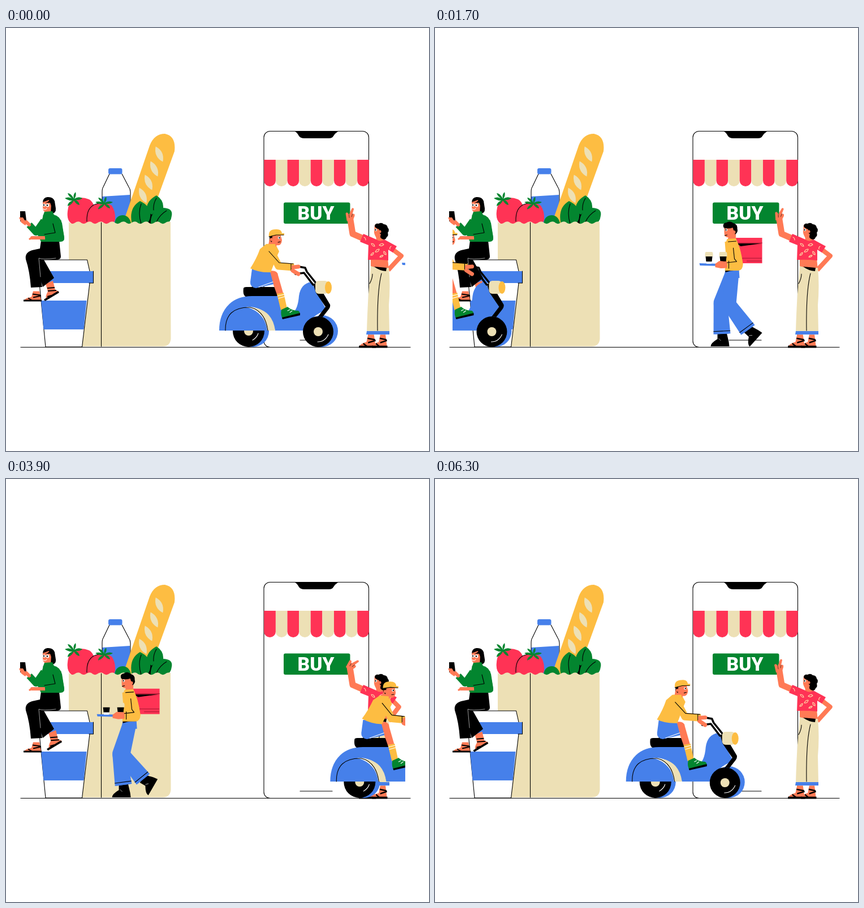
Animation of 748 by 748 pixels, one loop 6400 ms. Source, as an HTML page:

```html
<!DOCTYPE html>
<html lang="en">
<head>
<meta charset="utf-8">
<title>Shopping and delivery</title>
<style>
  html, body { margin: 0; width: 100%; height: 100%; overflow: hidden; background: #fff; }
  svg { display: block; width: 100vw; height: 100vh; }
  .b { fill: #4680ea } .r { fill: #ff3355 } .y { fill: #fdbd42 } .c { fill: #ede0b5 }
  .g { fill: #03852f } .s { fill: #ff7a55 } .k { fill: #000 } .w { fill: #fff }
  .l { fill: none; stroke: #000; stroke-width: 1.1; stroke-linecap: round; stroke-linejoin: round }
  .t { fill: none; stroke-linejoin: round; stroke-linecap: butt }
  .rd { stroke-linecap: round }
  .sb { stroke: #4680ea } .sy { stroke: #fdbd42 } .ss { stroke: #ff7a55 }
  .sg { stroke: #03852f } .sk { stroke: #000 }
</style>
</head>
<body>
<svg viewBox="0 0 748 748" xmlns="http://www.w3.org/2000/svg">
  <defs>
    <clipPath id="stage"><rect x="31" y="150" width="675" height="450"/></clipPath>
    <path id="slash" class="c" d="M0-15Q11 0 0 15Q-11 0 0-15Z"/>
    <path id="star" class="g" d="M0 1Q-9-5-16-1Q-9 4-2 3Q-11 6-11 13Q-3 10 0 3Q4 10 10 11Q9 4 2 2Q10 3 15-1Q8-5 1 0Q5-6 3-12Q-2-7 0 0Q-5-10-11-10Q-9-3 0 1Z"/>
    <g id="coffee">
      <path class="c" d="M-7 0L-6-3H6L7 0V5H-7Z"/>
      <path class="k" d="M-6 5H6L5 14H-5Z"/>
      <path class="w" d="M-5 14H5L4.500 18H-4.500Z"/>
    </g>
    <g id="shoe">
      <path class="k" d="M-8-2L8-3L12 14L13 22H-20Q-20 16-8 9Z"/>
      <path class="t" stroke="#fff" stroke-width=".6" d="M-6 8L-2 12"/>
    </g>
    <g id="sandal">
      <path class="s" d="M-5-16H6L9 0H-21Q-19-4-8-6Z"/>
      <path class="t sk" stroke-width="2" d="M-6-11L8-9M-5-5L9-8M-14-4L-7 0"/>
      <path class="k" d="M-22-1H10V2H-22Z"/>
    </g>
  </defs>

  <!-- phone -->
  <rect class="l" x="456" y="182.500" width="185.500" height="382" rx="11"/>
  <path class="k" d="M511 183H587Q582 186 579 191Q577 195 571 195H527Q521 195 518 191Q515 185 511 183Z"/>
  <g id="awning"></g>
  <rect class="g" x="491" y="308.500" width="117.500" height="37.500" rx="3"/>
  <text class="w" x="548" y="339" text-anchor="middle" font-family="Roboto, Arial, sans-serif" font-weight="900" font-size="33.500">BUY</text>
  <path class="l" d="M520 552H577M26 564.500H715"/>

  <!-- groceries -->
  <g>
    <path class="w" d="M183 258L172 281Q170 284 170 290V345H220V290Q220 284 217 281L205 258Z"/>
    <path class="b" d="M170 298L219 295V345H170Z"/>
    <path class="l" d="M183 258L172 281Q170 284 170 290V330M205 258L217 281Q220 285 220 290V330"/>
    <rect class="b" x="181" y="248" width="24.500" height="10.500" rx="3"/>
    <path class="y" d="M210 336L254 208Q262 187 281 187Q301 191 298 218L252 345H214Z"/>
    <use href="#slash" transform="translate(271 223) rotate(-25)"/>
    <use href="#slash" transform="translate(262 249) rotate(-25)"/>
    <use href="#slash" transform="translate(252 273) rotate(-25)"/>
    <use href="#slash" transform="translate(242 296) rotate(-25)"/>
    <path class="r" d="M120 303Q132 297 147 303Q160 310 160 346H116Q107 340 109 324Q110 309 120 303Z"/>
    <path class="r" d="M160 311Q176 307 187 314Q194 324 193 339Q191 346 186 347H143Q140 320 160 311Z"/>
    <path class="l" d="M143 342Q142 316 160 311L170 309"/>
    <use href="#star" transform="translate(120 302)"/>
    <use href="#star" transform="translate(174 309) scale(1 .9)"/>
    <path class="k" d="M250 312H268V346H250Z"/>
    <path class="g" d="M249 325Q246 307 266 296Q282 306 277 325Q267 321 258 330Z"/>
    <path class="g" d="M223 348Q216 318 237 306Q258 316 255 334Q254 346 240 350Z"/>
    <path class="g" d="M256 348Q254 325 274 318Q296 317 293 332Q292 344 280 349Z"/>
    <path class="g" d="M192 349Q192 332 206 331Q219 331 222 349Z"/>
    <path class="l" d="M239 311Q233 327 239 346M266 301Q260 311 261 322M284 323Q272 330 266 343"/>
  </g>
  <path id="bag" class="c"/>
  <path class="l" d="M168.500 344V563"/>

  <!-- cup -->
  <path class="w l" style="fill:#fff" d="M60 430L66 410H143.500L148 430V451L134.500 564H70L59 451Z"/>
  <path class="b" d="M62 482H142.500L137.500 533H66.500ZM62 430H154.500V451H62Z"/>
  <path class="l" d="M154.500 430V451H147"/>

  <!-- seated shopper -->
  <g>
    <g id="tap">
      <path class="s" d="M70 452L83 447L87 463L94 466L71 481Q69 474 74 466Z"/>
      <path class="t sk" stroke-width="2" d="M73 460L86 459M74 465L89 464M73 475L80 473"/>
      <path class="k" d="M67 480L92 465L94 468L69 483Z"/>
    </g>
    <use href="#sandal" transform="translate(53 481.500)"/>
    <path class="k" d="M62 376H94L97 404Q97 410 88 410H67L85 442L65 458L62 448L64 458L44 459Q42 430 35 409Q33 397 46 393L60 390Z"/>
    <path class="l" style="stroke:#fff;stroke-width:.6" d="M88 407Q65 410 58 407L61 440"/>
    <path class="s" d="M64 364H91V377H63Z"/>
    <path id="farArm" class="t sg" stroke-width="12"/>
    <path id="farFore" class="t ss rd" stroke-width="6"/>
    <path id="sweater" class="g"/>
    <path class="k" d="M65 309Q65 300 73 299Q83 298 86 306L88 319Q89 328 80 328Q71 326 68 320Z"/>
    <path class="s" d="M65 308L76 304L80 312L79 328H70L71 326Q65 325 65 317Z"/>
    <path class="k" d="M64 309Q74 310 77 304L84 305L82 320L78 309Z"/>
    <circle class="w" cx="67.500" cy="313" r="2.600"/><circle class="w" cx="73.500" cy="313.500" r="2.900"/>
    <circle class="k" cx="67" cy="313" r="1.200"/><circle class="k" cx="73" cy="313.500" r="1.300"/>
    <path class="l" style="stroke:#fff" d="M66 320Q69 323 72 319"/>
    <path class="g" d="M68 325L82 324L86 333H65Z"/>
    <g id="mobile">
      <path class="k" d="M-4-9L5-9L7 7L-4 9Z"/>
      <path class="s" d="M-6 2L1 2L4 7L9 11L5 16L-2 11Z"/>
    </g>
    <path id="nearFore" class="t ss rd" stroke-width="6"/>
    <path id="finger" class="t ss rd" stroke-width="3.200"/>
    <path id="nearArm" class="t sg" stroke-width="13"/>
    <path id="armLine" class="l"/>
  </g>

  <!-- pointing shopper -->
  <g>
    <use href="#sandal" transform="translate(645 563) scale(.95 1.300)"/>
    <use href="#sandal" transform="translate(666 563) scale(.85 1.300)"/>
    <path class="s" d="M645 407H675L677 428H645Z"/>
    <path id="hipArm" class="t ss" stroke-width="8"/>
    <path id="reach" class="t ss" stroke-width="11"/>
    <g id="hand">
      <path class="s" d="M-5 5L-8-8Q-7-11-4-9L-2-6L2-17Q4-20 6-17L4-8Q9-10 8-4L5 5Z"/>
      <path class="l" style="stroke-width:.6" d="M-2-6L-1-1M4-8L3-3"/>
    </g>
    <path class="c" d="M645 421Q660 426 677 424Q680 455 677 490L678 537H638Q639 500 641 470Z"/>
    <path class="k" d="M651 422L673 424L672 430Q660 429 651 422Z"/>
    <path class="l" d="M664 434Q656 465 657 535M643 452Q648 443 648 435"/>
    <path class="b" d="M638 536H678V542H637Z"/>
    <path class="s" d="M654 364H667L669 379L655 378Z"/>
    <path class="r" d="M632 364L655 374Q662 379 669 374L691 386L684 397L676 392L676 411Q658 409 640 410L641 384L626 378Z"/>
    <path class="l" style="stroke:#ffd9a6;stroke-width:1.200" d="M646 381q5 0 6 5q-5 0-6-5M660 384q5-5 8-1q-4 4-8 1M653 396q2-5 7-5q-1 6-7 5M668 395q4 1 4 6q-5-1-4-6M645 402q1-4 5-5q0 5-5 5M661 405q2-4 6-3q-2 4-6 3M633 370q3 1 3 5M681 386q-3 2-2 5"/>
    <path class="s" d="M652 348L663 352L666 370L655 371Q650 364 651 358Z"/>
    <circle class="w" cx="654" cy="357" r="2.200"/><circle class="k" cx="653.500" cy="357" r="1.200"/>
    <path class="k" d="M652 351Q652 345 659 346Q664 343 668 347Q674 347 675 353Q679 357 675 362Q677 367 673 370Q671 376 665 373Q660 370 663 365Q658 361 660 356Q655 355 652 351Z"/>
    <circle class="s" cx="661" cy="360" r="2.500"/>
  </g>

  <g clip-path="url(#stage)">
    <!-- courier on foot -->
    <g id="walker">
      <g id="back"><use href="#shoe"/><path class="t sb" stroke-width="24"/><path class="b"/><path class="l"/></g>
      <g id="front"><use href="#shoe"/><path class="t sb" stroke-width="24"/><path class="b"/><path class="l"/></g>
      <g id="upper">
        <path class="r" d="M64 371H111V416H64Z"/>
        <path class="k" d="M66 381H110L73 386Z"/>
        <path class="l" style="stroke:#8c1028;stroke-width:.8" d="M65 380H111M66 407H110M84 412H110"/>
        <path class="b" d="M46 426H70L71 442H44Z"/>
        <path class="k" d="M46 424H69V429Q57 428 46 432Z"/>
        <path class="y" d="M45 378L66 375Q74 393 77 417Q77 428 69 429H45L47 404Z"/>
        <path class="s" d="M44 351L62 351L65 360L64 376H50L51 370Q44 371 44 362Z"/>
        <path class="y" d="M49 373L65 372L66 379H47Z"/>
        <path class="k" d="M43 353Q40 345 48 344Q54 340 60 345Q68 347 67 355Q69 361 63 365L59 353Q51 356 43 353Z"/>
        <circle class="s" cx="61" cy="361" r="3"/>
        <circle class="w" cx="47.500" cy="357" r="2.200"/><circle class="k" cx="47" cy="357" r="1.200"/>
        <path class="l" d="M45 354L49 353M45 367L49 366M51 378L65 377"/>
        <path class="b" d="M0 416L40 417V421L1 420Z"/>
        <use href="#coffee" transform="translate(17 399)"/><use href="#coffee" transform="translate(42 399)"/>
        <path class="s" d="M28 417L35 412L51 413V424L38 425L28 423Z"/>
        <path class="y" d="M49 411L61 411L60 386L71 388L77 417Q77 427 68 427L49 425Z"/>
        <path class="l" d="M60 389L62 408L66 413L49 415M52 412V425"/>
      </g>
    </g>

    <!-- courier on scooter -->
    <g id="scooter">
      <circle class="b" cx="437" cy="536" r="28"/><circle class="k" cx="429" cy="536" r="28"/>
      <circle class="c" cx="429" cy="536" r="8"/>
      <path class="l" style="stroke:#fff" d="M436 552Q444 547 446 540"/>
      <circle class="b" cx="559" cy="536" r="28"/>
      <path class="k" d="M420 460Q421 458 425 458H480L484 476H426Q418 474 420 460Z"/>
      <path class="b" d="M377 535Q377 505 395 488Q410 474 435 474H480Q486 499 504 506Q516 500 518 474Q521 452 540 449L550 468L567 499Q538 508 527 535Z"/>
      <path class="w" d="M424 493Q465 491 476 535H462Q458 502 424 493Z"/>
      <path class="c" d="M433 494Q471 497 476 535H463Q461 508 433 494Z"/>
      <path class="l" d="M388 535Q387 493 432 494Q458 500 463 535"/>
      <path class="k" d="M543 452L551 452L573 489Q574 493 571 497L560 511L552 510L565 493L548 468Z"/>
      <circle class="k" cx="552" cy="537" r="27"/><circle class="c" cx="552" cy="537" r="8"/>
      <path class="l" style="stroke:#fff" d="M551 555Q564 555 570 542"/>
      <path class="t sk rd" stroke-width="3.500" d="M518 422L529 424L532 431L548 451M512 435L527 433L543 454"/>
      <rect class="c" x="547" y="447" width="23" height="23" rx="6"/>
      <ellipse class="y" cx="570" cy="459" rx="6" ry="11"/>
      <path class="l" d="M435 458L478 444"/>
      <path class="s" d="M464 430Q480 427 481 437L491 472L480 474L468 440Z"/>
      <path class="y" d="M479 470L491 468L497 496L486 499Z"/>
      <path class="l" style="stroke:#fff" d="M480 474L492 471M482 478L493 475"/>
      <path class="g" d="M487 498L498 493Q505 500 517 500Q521 503 519 506L489 514Q485 507 487 498Z"/>
      <path class="k" d="M488 512L520 504V508L489 515Z"/>
      <path class="l" style="stroke:#fff" d="M498 500L502 498M502 503L506 500"/>
      <path class="b" d="M435 426L466 427L473 453L442 460Q431 458 432 449Z"/>
      <path class="l" style="stroke:#fff" d="M447 458L472 449"/>
      <g id="lean">
        <path class="y" d="M460 382L476 381L483 395L479 404L468 432Q448 433 432 425Q443 408 449 391Z"/>
        <path class="s" d="M467 366L485 364L488 375Q487 386 479 384L477 387L464 384Z"/>
        <path class="k" d="M466 368H471L470 379L466 375Z"/>
        <circle class="s" cx="469" cy="374" r="2.700"/>
        <path class="y" d="M465 369Q463 356 477 356Q487 355 488 363L492 363V366L477 367Z"/>
        <path class="l" d="M465 369L478 366L491 366M481 379L485 378"/>
        <circle class="w" cx="483" cy="371" r="2.200"/><circle class="k" cx="483.500" cy="371" r="1.200"/>
        <path class="y" d="M461 382L476 382L477 387L460 386Z"/>
      </g>
      <path id="rideArm" class="t sy" stroke-width="13"/>
      <path id="rideLine" class="l"/>
      <path id="rideHand" class="t ss rd" stroke-width="7"/>
    </g>
  </g>
</svg>
<script>
const el = id => document.getElementById(id);
const set = (id, d) => el(id).setAttribute('d', d);
const move = (id, v) => el(id).setAttribute('transform', v);
const mix = (a, b, k) => a + (b - a) * k;
const line = pts => 'M' + pts.map(p => p[0].toFixed(2) + ' ' + p[1].toFixed(2)).join('L');
const blend = (a, b, k) => a.map((p, i) => [mix(p[0], b[i][0], k), mix(p[1], b[i][1], k)]);
const wave = (f, n, shift = 0) => (1 - Math.cos((f - shift) * 2 * Math.PI / n)) / 2;
const ease = k => { k = Math.max(0, Math.min(1, k)); return k * k * (3 - 2 * k); };

// awning and scalloped bag edge
let strips = '';
for (let i = 0; i < 9; i++) {
  const w = 185.5 / 9, x = 456.3 + i * w;
  strips += `<path class="${i % 2 ? 'c' : 'r'}" d="M${x} 233h${w}v37a${w / 2} 10 0 0 1 ${-w} 0z"/>`;
}
el('awning').innerHTML = strips;
set('bag', 'M111 343' + 'q5 5 10 2q5 -4 10 -2'.repeat(9) + 'L291.500 550Q290 563 277 563H111Z');

// walk cycle of 16 drawings: time, ankle x, ankle y, foot turn
const gait = [
  [0, 32, 537, 4], [2, 40, 541, 0], [3, 47, 541, 0], [6, 74, 541, 0], [8, 91, 538, -14],
  [10, 86, 534, -48], [11, 82, 531, -60], [14, 60, 522, -28], [16, 32, 537, 4]
];

function leg(id, u, hipY) {
  u = (u % 16 + 16) % 16;
  const i = gait.findIndex((g, n) => n && u <= g[0]);
  const a = gait[i - 1], b = gait[i], k = (u - a[0]) / (b[0] - a[0]);
  const [x, y, turn] = [1, 2, 3].map(n => mix(a[n], b[n], k));
  const hip = [58, hipY], dx = x - hip[0], dy = y - hip[1], d = Math.hypot(dx, dy);
  const bend = Math.sqrt(Math.max(0, 56 * 56 - d * d / 4));
  const knee = [hip[0] + dx / 2 - dy / d * bend, hip[1] + dy / 2 + dx / d * bend];
  const sx = x - knee[0], sy = y - knee[1], n = Math.hypot(sx, sy);
  const ux = sx / n, uy = sy / n;
  const across = (px, py, w) => [[px - uy * w, py + ux * w], [px + uy * w, py - ux * w]];
  const [shoe, cloth, flare, hem] = el(id).children;
  shoe.setAttribute('transform', `translate(${x} ${y}) rotate(${turn})`);
  cloth.setAttribute('d', line([hip, knee, [x, y]]));
  flare.setAttribute('d', line([...across(...knee, 12), ...across(x, y, 15).reverse()]) + 'Z');
  hem.setAttribute('d', line(across(x - ux * 5, y - uy * 5, 14.5)));
}

function walker(f) {
  const bob = 2.4 * Math.cos((f - 1.2) * Math.PI / 4) - 2.3;
  move('walker', `translate(${700 - f * 9.3} 0)`);
  move('upper', `translate(0 ${bob})`);
  leg('front', f + 1, 433 + bob);
  leg('back', f + 9, 433 + bob);
}

function scooter(f) {
  const span = 942.4, x = f / 48 * span;
  const sway = Math.sin(f * Math.PI / 24);
  move('scooter', `translate(${x > 340 ? x - span : x} 0)`);
  move('lean', `rotate(${4.5 * sway} 450 440)`);
  const shoulder = [468 + 4 * sway, 393 + 1.5 * sway];
  const elbow = [482 + 3 * sway, 421 + 2.5 * sway];
  const wrist = [509, 423 + 3 * sway];
  set('rideArm', line([shoulder, elbow, wrist]));
  set('rideLine', line([[shoulder[0] - 3, shoulder[1] + 2], [elbow[0] + 1, elbow[1] - 6], [wrist[0] - 1, wrist[1] - 6]])
    + line([[wrist[0] - 5, wrist[1] - 6], [wrist[0] - 5, wrist[1] + 6]]));
  set('rideHand', line([[wrist[0] - 1, wrist[1]], [517, 422 + sway]]) + line([[wrist[0] - 2, wrist[1] + 6], [517, 435]]));
}

function seated(f) {
  const p = f % 32, up = ease((p - 4) / 8) * ease((25 - p) / 7);
  const swipe = ease((p - 12) / 5) * ease((25 - p) / 5);
  move('tap', `translate(${5.5 * wave(f, 24)} ${-3 * wave(f, 24)})`);
  const far = blend([[67, 341], [53, 361], [41, 348]], [[66, 342], [55, 355], [42, 345]], up);
  const near = blend([[91, 341], [96, 369], [69, 371]], [[89, 343], [80, 352], [55, 340]], up);
  const palm = [mix(46, mix(46, 36, swipe), up), mix(371, mix(326, 331, swipe), up)];
  const low = mix(378, 368, up);
  set('sweater', `M66 331L84 330Q95 332 99 345L${mix(103, 98, up)} ${low - 8}Q${mix(104, 99, up)} ${low} 96 ${low}H62L56 ${mix(366, 357, up)}Z`);
  set('farArm', line(far));
  set('farFore', line([far[2], [36, 343]]));
  set('nearArm', line(near));
  set('nearFore', line([near[2], palm]));
  set('finger', line([palm, [palm[0] + mix(-4, 5, up * (1 - swipe)), palm[1] + mix(2, -9, up * (1 - swipe))]]));
  set('armLine', line(blend([[83, 346], [87, 362], [68, 365]], [[94, 362], [82, 361], [66, 351]], up)));
  move('mobile', `translate(${29 + 2 * swipe} ${333 - swipe}) rotate(${18 * swipe})`);
}

function pointing(f) {
  const tilt = ease(1 - wave(f, 24, 8.5)), elbow = 703 - 4.5 * wave(f, 24);
  set('hipArm', line([[683, 391], [elbow - 4, 403], [676, 428]]));
  set('reach', line([[645, 378], [613, 364], [608, 333]]));
  move('hand', `translate(608 ${337 - 5 * tilt}) rotate(${42 * tilt})`);
}

// the clock moves in tenths of a second over a 15 fps drawing
function draw(ms) {
  const tick = Math.floor((ms % 6400) / 100 + 1e-4), f = Math.floor(tick * 1.5);
  walker(f);
  scooter(f % 48);
  seated(f);
  pointing(f);
}

const start = performance.now();
function loop() {
  draw(performance.now() - start);
  requestAnimationFrame(loop);
}
draw(0);
requestAnimationFrame(loop);
</script>
</body>
</html>
```
